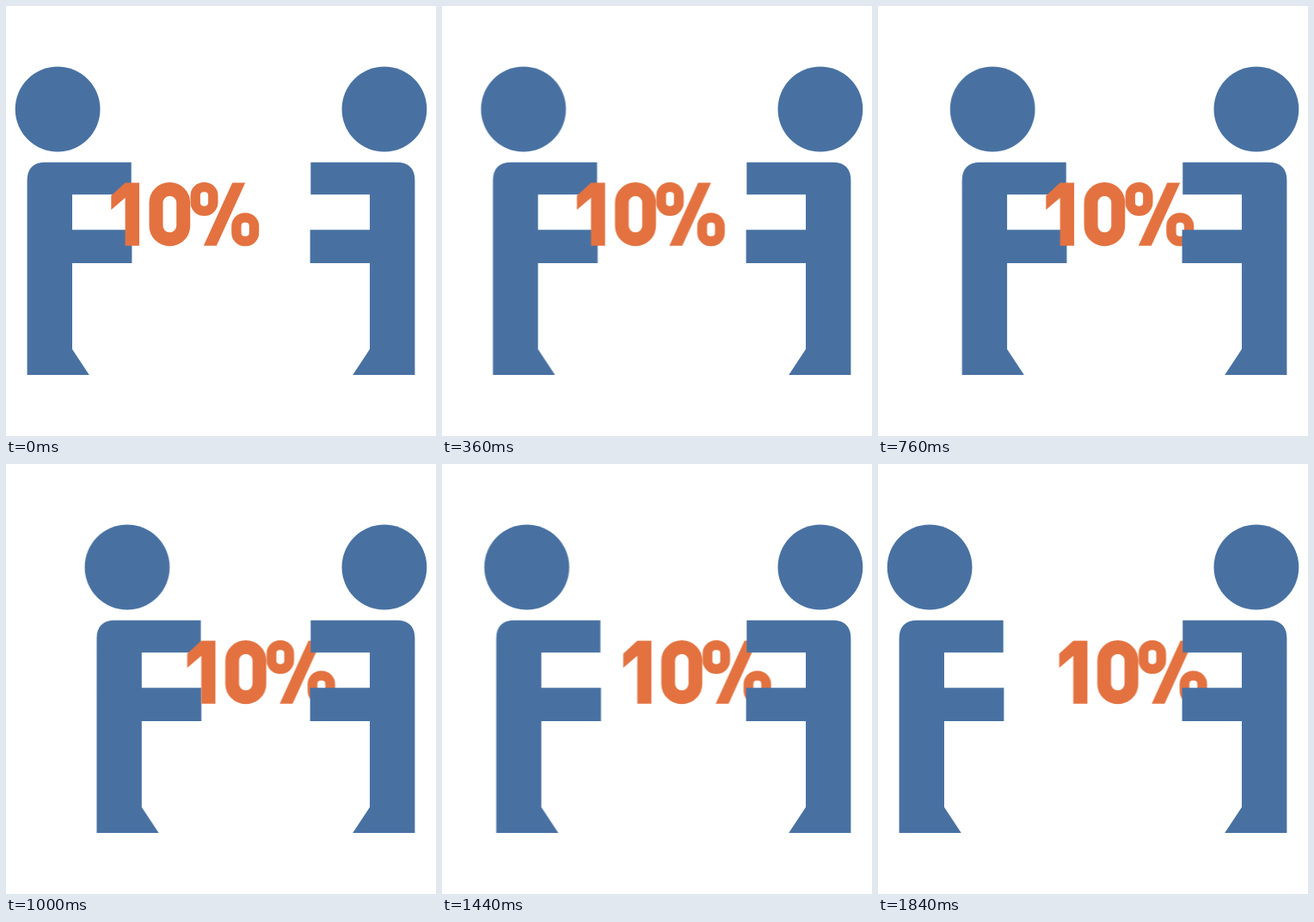
Animation of 500x500 px, one loop 1.88 s. Source, as an HTML page:

```html
<!DOCTYPE html>
<html lang="en">
<head>
<meta charset="utf-8">
<title>Handing over 10%</title>
<style>
  html, body { margin: 0; width: 100%; height: 100%; overflow: hidden; background: #fff; }
  svg { display: block; width: 100%; height: 100%; }
  .person { fill: #4871a2; }
  #amount { fill: #e37240; }
  #amount rect { fill: none; stroke: #e37240; }
</style>
</head>
<body>
<svg viewBox="0 0 500 500">
  <defs>
    <g id="figure">
      <circle cx="60.1" cy="120" r="49.4"/>
      <path d="M24.6 429V203Q24.6 181.7 46 181.7H145.7V219.2H77V260.2H146.4V299H77V399L96.8 429Z"/>
    </g>
  </defs>

  <g id="giver" class="person"><use href="#figure"/></g>

  <g id="amount" role="img" aria-label="10%">
    <path d="M122.3 220.6L138.6 205.6H155V278.7H138.6V223L122.3 237Z"/>
    <rect x="174.5" y="213" width="31.7" height="58.2" rx="15.8" stroke-width="16"/>
    <rect x="220.2" y="210.6" width="20.6" height="27.8" rx="9.8" stroke-width="11.4"/>
    <rect x="267.9" y="246.1" width="20.6" height="27.4" rx="9.8" stroke-width="11.4"/>
    <path d="M263.2 205.6H278.2L244.8 278.7H229.8Z"/>
  </g>

  <g class="person" transform="matrix(-1 0 0 1 500 0)"><use href="#figure"/></g>
</svg>
<script>
  const TICK = 40, STEPS = 23, LOOP = 47 * TICK;
  const REACH = STEPS * 100 / 26;
  const turn = STEPS * TICK / LOOP;
  const easing = `steps(${STEPS}, end)`;

  const at = (x, offset, ease = 'linear') =>
    ({ transform: `translateX(${x}px)`, offset, easing: ease });

  // The 1 ms lead keeps samples on a tick boundary inside the new step.
  const play = (id, frames) => document.getElementById(id)
    .animate(frames, { duration: LOOP, iterations: Infinity, delay: -1 });

  // The giver walks over and back; the amount stays with the receiver.
  play('giver', [at(0, 0, easing), at(REACH, turn, easing), at(0, 2 * turn), at(0, 1)]);
  play('amount', [at(0, 0, easing), at(REACH, turn), at(REACH, 1)]);
</script>
</body>
</html>
```
